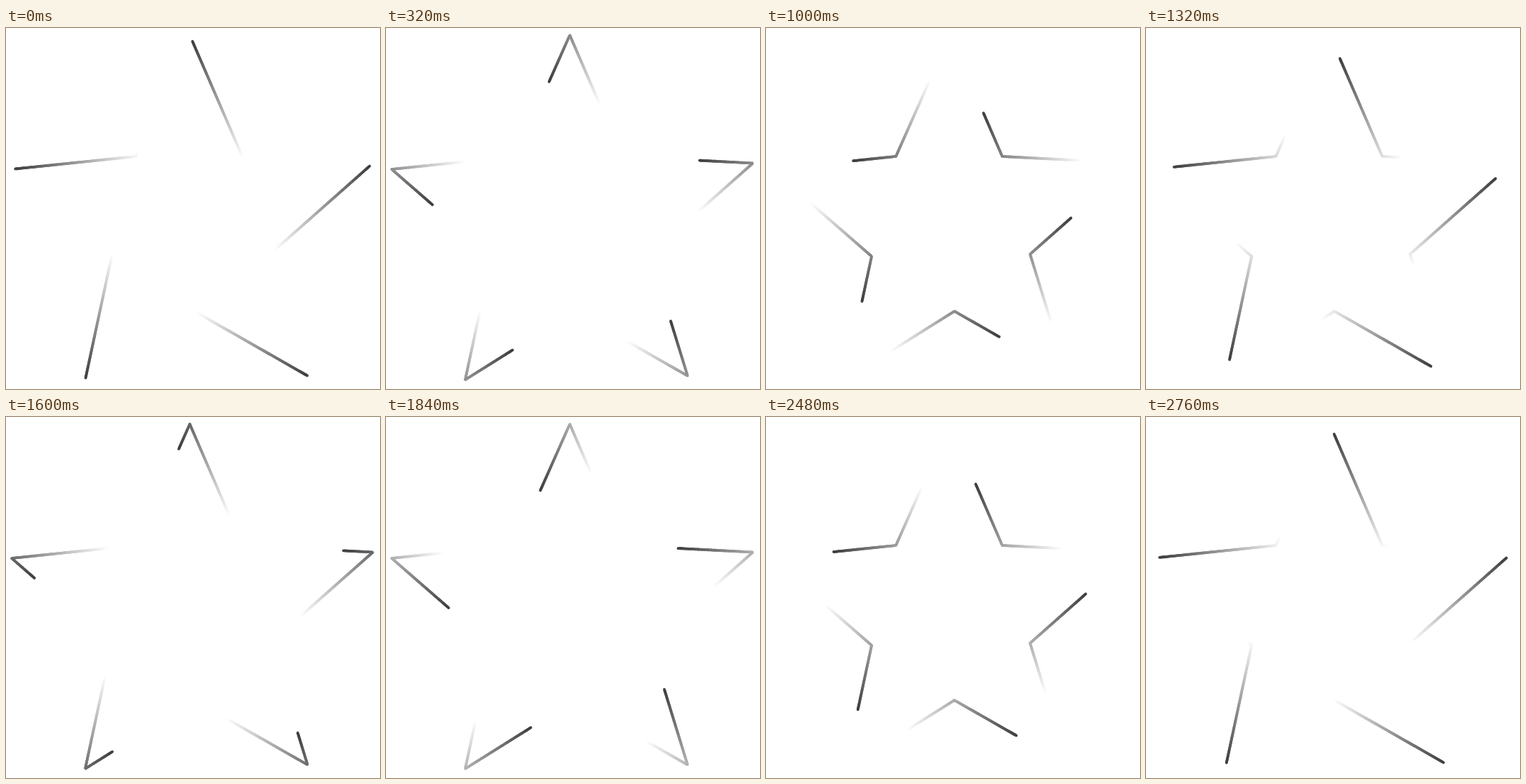
Animation, 524 px wide and 506 px high, one loop 2800 ms. Source, as an HTML page with a canvas:

```html
<!DOCTYPE html>
<html>
<head>
<meta charset="utf-8">
<title>Star trails</title>
<style>
  html, body { margin: 0; width: 100%; height: 100%; overflow: hidden; background: #fff; }
  canvas { display: block; filter: blur(.5px); }
</style>
</head>
<body>
<canvas id="stage" width="524" height="506"></canvas>
<script>
const ctx = document.getElementById('stage').getContext('2d');

// Star outline, counter-clockwise from the top point
const star = [
  [257.5, 10], [182, 180], [8, 198], [148, 320], [111, 493],
  [264, 397], [422.5, 487.5], [370, 317], [514, 189.5], [331, 180]
];
const edges = star.map((from, i) => {
  const to = star[(i + 1) % star.length];
  return { from, to, length: Math.hypot(to[0] - from[0], to[1] - from[1]) };
});
const perimeter = edges.reduce((sum, edge) => sum + edge.length, 0);

const COMETS = 5, TRAIL = 178, STEP = 2;
const FRAME_MS = 40, FRAMES = 70;
const HEAD_GRAY = 62;

function pointAt(distance) {
  let rest = ((distance % perimeter) + perimeter) % perimeter;
  let i = 0;
  while (i < edges.length - 1 && rest > edges[i].length) rest -= edges[i++].length;
  const { from, to, length } = edges[i];
  const k = rest / length;
  return [from[0] + (to[0] - from[0]) * k, from[1] + (to[1] - from[1]) * k];
}

function drawComet(head) {
  for (let back = TRAIL; back > 0; back -= STEP) {
    const gray = Math.round(HEAD_GRAY + (255 - HEAD_GRAY) * back / TRAIL);
    ctx.strokeStyle = `rgb(${gray},${gray},${gray})`;
    ctx.beginPath();
    ctx.moveTo(...pointAt(head - back));
    ctx.lineTo(...pointAt(head - back + STEP));
    ctx.stroke();
  }
}

function draw(time) {
  const n = Math.floor(time / FRAME_MS) % FRAMES;
  const head = -9.4 + 10.06 * n + 0.00636 * n * n; // speeds up slightly over the loop
  ctx.clearRect(0, 0, 524, 506);
  ctx.lineWidth = 3.8;
  ctx.lineCap = 'round';
  for (let i = 0; i < COMETS; i++) drawComet(head + perimeter * i / COMETS);
}

const start = performance.now();
function tick() {
  draw(performance.now() - start);
  requestAnimationFrame(tick);
}
tick();
</script>
</body>
</html>
```
